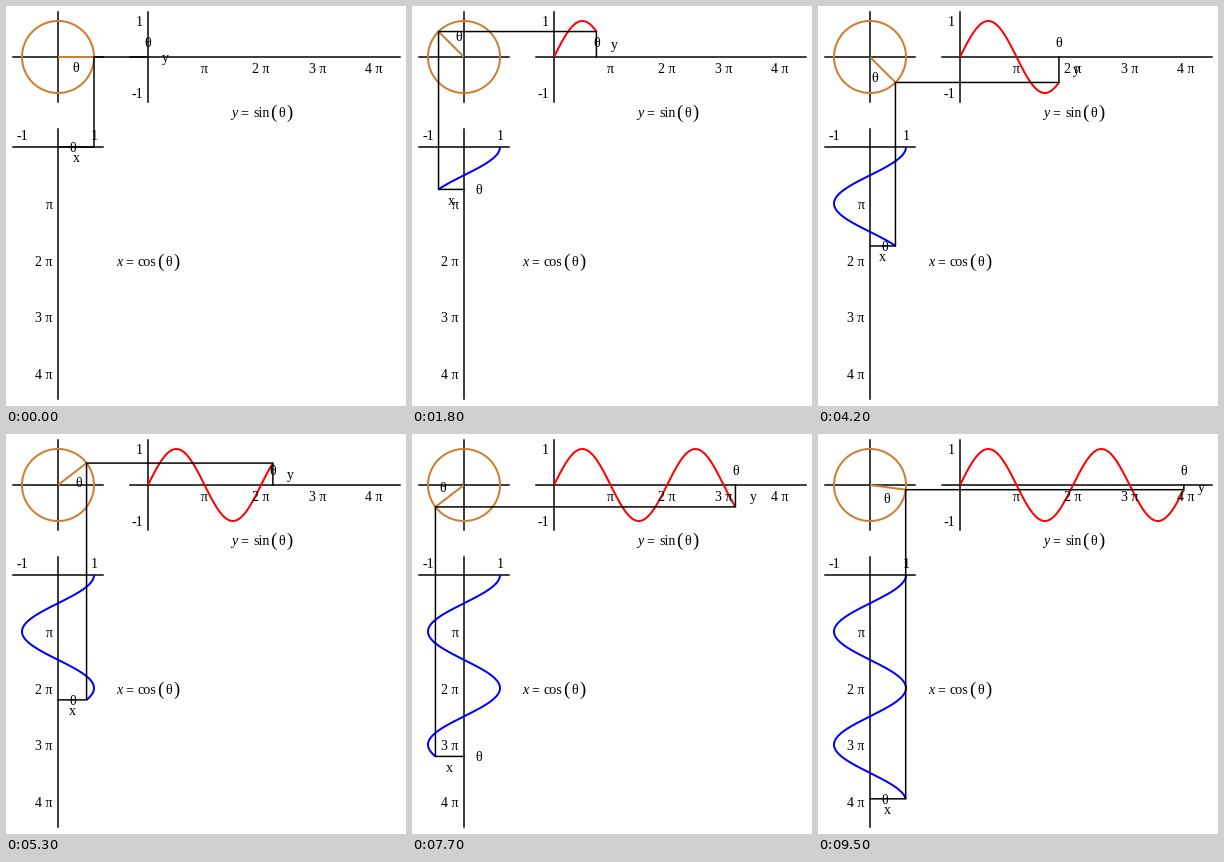
Write a matplotlib script that moves like this. It is 400 by 400 pixels and loops after 9600 ms.

```python
import numpy as np
import matplotlib.pyplot as plt
from matplotlib.animation import FuncAnimation

SIZE, DPI = 400, 100
FRAMES, INTERVAL = 96, 100
PX = 72 / DPI              # points per pixel
R = 36                     # pixels per unit
K = R / 2                  # pixels per radian along the theta axes
CX, CY = 52, 51            # circle centre
SX, TY = CX + 90, CY + 90  # origins of the sine and cosine plots
GOLD = "#cc7f32"
FONT = 14
DROP = 4.7                 # text centre to baseline

plt.rcParams["font.family"] = "Liberation Serif"

fig = plt.figure(figsize=(SIZE / DPI, SIZE / DPI), dpi=DPI, facecolor="white")
ax = fig.add_axes([0, 0, 1, 1])
ax.set_xlim(0, SIZE)
ax.set_ylim(SIZE, 0)
ax.axis("off")


def line(xs, ys, color="black", width=1.5, z=1):
    art, = ax.plot(xs, ys, color=color, lw=width * PX, zorder=z, snap=False,
                   solid_capstyle="projecting", solid_joinstyle="miter")
    return art


def label(x, y, s, ha="center", size=FONT, **kw):
    """Text whose digits are vertically centred on y."""
    return ax.text(x, y + DROP, s, ha=ha, va="baseline", color="black",
                   fontsize=size * PX, zorder=5, **kw)


def curve(color):
    art = line([], [], color, 2, 2)
    art.set_solid_capstyle("butt")
    art.set_solid_joinstyle("round")
    return art


def formula(x, y, var, func, width):
    """Write var = func(theta) with enlarged parentheses."""
    label(x, y, var, "left", style="italic")
    label(x + 9.5, y, "=", "left")
    label(x + 22, y, func, "left")
    end = x + 22 + width
    label(end + 3.5, y + 1, "(", size=19)
    label(end + 12, y, "θ")
    label(end + 20, y + 1, ")", size=19)


# Axes
half = 1.25 * R
line([CX - half, CX + half], [CY, CY])
line([CX, CX], [CY - half, CY + half])
line([SX - K, SX + 14 * K], [CY, CY])
line([SX, SX], [CY - half, CY + half])
line([CX - half, CX + half], [TY, TY])
line([CX, CX], [TY - K, TY + 14 * K])

# Tick labels and formulas
for v in (-1, 1):
    label(SX - 5, CY - v * R, str(v), "right")
    label(CX + v * R, TY - 12, str(v))
for m in range(1, 5):
    tick = "π" if m == 1 else f"{m} π"
    label(SX + m * np.pi * K, CY + 11.5, tick)
    label(CX - 5.5, TY + m * np.pi * K + 1, tick, "right")
formula(225, 106.5, "y", "sin", 16.5)
formula(110, 255.5, "x", "cos", 18.7)

# Circle
turn = np.linspace(0, 2 * np.pi, 121)
line(CX + R * np.cos(turn), CY - R * np.sin(turn), GOLD, 2, 2)

# Moving parts
radius = curve(GOLD)
sine = curve("red")
cosine = curve("blue")
link = line([], [], z=3)
angle_tag = label(0, 0, "θ")
sine_theta = label(0, 0, "θ")
sine_y = label(0, 0, "y")
cos_theta = label(0, 0, "θ")
cos_x = label(0, 0, "x")


def move(text, x, y):
    text.set_position((x, y + DROP))


def update(n):
    theta = 4 * np.pi * n / FRAMES
    c, s = np.cos(theta), np.sin(theta)
    px, py = CX + R * c, CY - R * s
    gx, gy = SX + K * theta, TY + K * theta
    mx, my = (CX + px) / 2, (CY + py) / 2

    t = np.linspace(0, theta, 2 * n + 2) if n else np.array([])
    sine.set_data(SX + K * t, CY - R * np.sin(t))
    cosine.set_data(CX + R * np.cos(t), TY + K * t)
    radius.set_data([CX, px], [CY, py])
    link.set_data([CX, px, px, gx, gx], [gy, gy, py, py, CY])

    move(angle_tag, mx + 0.3 * R * s, my + 0.3 * R * c)
    move(sine_theta, gx, CY - 0.4 * R)
    move(sine_y, gx + 0.49 * R, my)
    move(cos_theta, CX + 0.4 * R, gy)
    move(cos_x, mx, gy + 0.3 * R)
    return (radius, sine, cosine, link, angle_tag,
            sine_theta, sine_y, cos_theta, cos_x)


anim = FuncAnimation(fig, update, frames=FRAMES, interval=INTERVAL,
                     repeat=True, repeat_delay=0)
plt.show()
```
